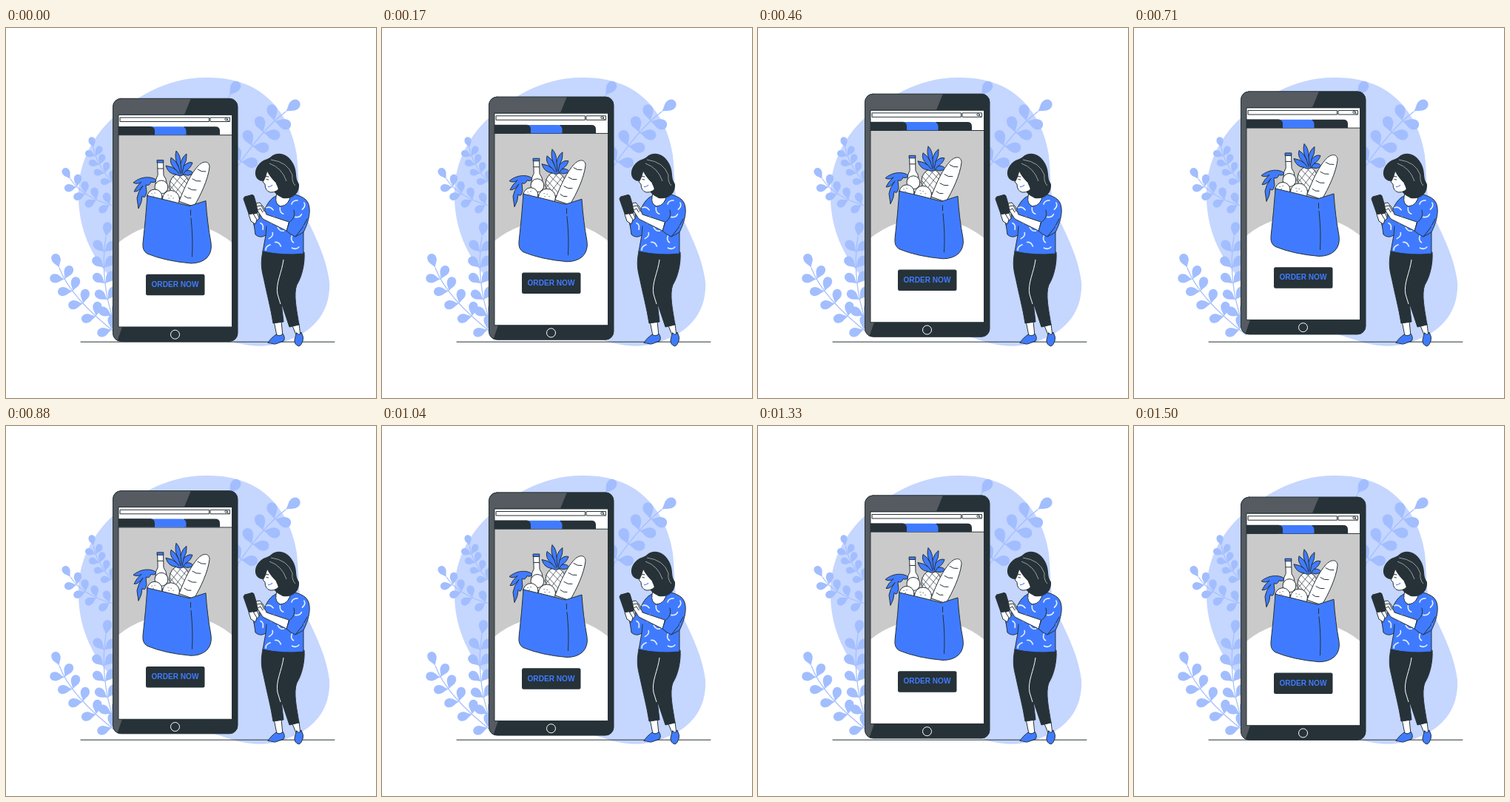
Recreate the animation shown at these times as an HTML page. Size 500x500 px, loop 1.54 s.

```html
<!DOCTYPE html>
<html lang="en">
<head>
<meta charset="utf-8">
<title>Order now</title>
<style>
  html, body { margin: 0; width: 100%; height: 100%; overflow: hidden; background: #fff; }
  svg { display: block; width: 100%; height: 100%; }
  .ink { fill: #263238; }
  .blue { fill: #407bff; }
  .white { fill: #fff; }
  .line { fill: none; }
  .edge { stroke: #263238; stroke-width: 1; stroke-linejoin: round; stroke-linecap: round; }
  .label { font: 700 10.1px "Liberation Sans", Arial, sans-serif; fill: #407bff; }
</style>
</head>
<body>
<svg viewBox="0 0 500 500">
  <clipPath id="case"><rect x="144.500" y="95.300" width="168.500" height="328.200" rx="11"/></clipPath>
  <path fill="#c5d6ff" d="M270 67C305 66 335 77 353 94C377 115 389 145 393 172C396 200 394 224 401 243C412 273 432 303 437 343C439 379 420 404 394 416C368 430 345 433 313 426L200 390L146 342C122 318 96 277 98 220C99 180 118 145 146 120C172 96 215 67 270 67Z"/>
  <g id="plants" fill="#a2beff" stroke="#a2beff"></g>
  <path class="edge" d="M101 424.2H444"/>

  <g id="woman">
    <!-- legs -->
    <g class="edge white">
      <path d="M362 396L366 416L374 416L372 396Z"/>
      <path d="M386 400L393 417L398 416L396 400Z"/>
    </g>
    <g class="edge blue">
      <path d="M354 425Q358 419 365 414Q370 418 374 413Q378 419 375 423L364 427Z"/>
      <path d="M393 412Q396 417 399 411Q403 418 401 423Q399 429 396 430Q389 428 390 421Z"/>
    </g>
    <path class="ink edge" d="M347 302L403 303C404 318 400 336 393 347C388 360 393 382 396 401L383 404L372 371L375 397L361 399C358 379 352 357 348 337C344 322 345 312 347 302Z"/>
    <path class="line" stroke="#fff" d="M375 313C373 330 364 345 367 360L371 373"/>

    <!-- far arm and body -->
    <path class="white edge" d="M331 250L327 241Q325 236 330 237L338 246L344 262L336 268Z"/>
    <path class="blue edge" d="M365 227C357 230 352 239 348 249L342 249L343 256L335 265L337 279Q343 285 351 280L347 302Q375 308 402 305L402 276C409 262 413 246 408 236C404 228 394 226 384 223Z"/>
    <path class="white edge" d="M365 228Q363 238 371 241Q383 240 385 224L381 216L367 218Z"/>
    <g id="marks" class="line" stroke="#eaf0ff" stroke-width="1.6" stroke-linecap="round" stroke-linejoin="round"></g>
    <path class="line edge" d="M352 268L351 280M389 246Q392 255 384 262M402 276L391 282"/>

    <!-- hand-held phone and near hand -->
    <path class="ink edge" d="M323 228L332 225.500Q334 225 335 227L341 247Q341 249 339 250L331 252.500Q329 253 328 251L321 231Q321 229 323 228Z"/>
    <path class="white edge" d="M382 262L352 252L348 242L343 236L338 237L340 247L347 258L379 274Z"/>
    <path class="line edge" d="M339 241L345 240L349 248M340 246L344 244L347 249"/>
    <path class="white edge" d="M328 252L331 261L337 265L339 259L334 251Z"/>
    <path class="blue edge" d="M383 262L379 274Q385 280 391 282Q402 270 407 258"/>

    <!-- head -->
    <path class="ink" d="M347 207C336 206 334 194 341 185C347 177 354 178 358 174C368 165 383 171 389 185C394 196 390 202 396 211C397 223 388 232 374 230L367 226Z"/>
    <path class="white edge" d="M353 193C351 200 350 204 347 208L350 211Q350 220 357 222Q366 223 372 213C374 205 367 203 364 208C359 203 356 199 353 193Z"/>
    <path class="ink" d="M353 187C356 198 368 209 370 227L382 224L378 186Z"/>
    <path class="line edge" d="M352 204.500L354.500 205M351 200.500L355 201"/>
    <path class="line" stroke="#407bff" stroke-width="1.2" d="M354 214.500Q358 215 360 212"/>
    <path class="line" stroke="#c8cdd0" stroke-width=".7" d="M358 178Q381 181 387 199Q386 208 391 213M356 183Q373 189 379 207"/>
  </g>

  <g id="phone">
    <g clip-path="url(#case)">
      <path class="ink" d="M144 95H314V424H144Z"/>
      <path fill="#555b60" d="M144 95H250L241 117H152V404H157L150 424H144Z"/>
    </g>
    <rect class="line edge" x="144.500" y="95.300" width="168.500" height="328.200" rx="11"/>
    <rect class="white" x="152" y="117.700" width="153.500" height="286.300"/>
    <path fill="#cacaca" d="M152 145H305.500V290A122 122 0 0 0 152 290Z"/>
    <path class="line edge" d="M152 117.700V404H305.500V117.700Z"/>

    <!-- browser bar -->
    <g class="line edge">
      <rect x="154.500" y="121" width="120" height="5.500"/>
      <rect x="276.500" y="121" width="26" height="5.500"/>
      <circle cx="297.500" cy="123.300" r="1.600"/>
      <path d="M299 124.500L301 126M152 133.500H196M152 144.700H305"/>
    </g>
    <path class="ink" d="M240 133.300H283Q289 133.300 289 139V144.500H240Z"/>
    <path class="blue" d="M194 133.300H237Q243 133.300 243.500 139V144.500H194Z"/>
    <path class="ink" d="M152 133.300H195Q201 133.300 201 139V144.500H152Z"/>

    <!-- groceries -->
    <g class="edge">
      <path class="blue" d="M204 206C196 199 181 201 172 209Q178 212 183 208Q176 214 173 221Q179 222 185 213Q178 222 177 230L179 244Q184 236 184 227Q188 232 190 222L189 212Q194 214 196 208Q200 210 204 206Z"/>
      <path class="white" d="M205 180H212.500L213 199Q217 204 217 210V228H202V210Q202 204 205 199Z"/>
      <path class="blue" d="M204.500 178.500H212.800V182H204.500Z"/>
      <path class="line" d="M205 190H212.500"/>
      <ellipse class="white" cx="234.500" cy="213" rx="13.500" ry="16"/>
      <path class="line" stroke-width=".7" d="M222 207L240 227M226 201L245 220M232 198L247 213M238 198L222 218M244 203L228 224M247 210L237 226M222 213L233 227"/>
      <path class="blue" d="M229 198Q219 197 216 186Q225 187 230 192Q220 184 223 175Q230 179 233 187Q227 176 230 166Q236 172 236 183Q238 174 244 170Q245 179 240 187Q246 180 252 182Q250 189 243 193Q249 191 253 196Q247 201 241 198Q235 201 229 198Z"/>
      <path class="line" d="M230 192L234 197M233 187L236 197M236 183L237 195M240 187L238 197M243 193L239 198"/>
      <path class="white" d="M234 234C242 213 250 197 259 187C266 179 275 179 275 188C273 205 263 226 254 241Z"/>
      <path class="line" d="M259 191Q264 195 270 194M252 204Q257 208 263 207M246 216Q251 220 257 219M241 227Q245 231 250 230"/>
      <circle class="white" cx="210" cy="215" r="9"/>
      <circle class="white" cx="201" cy="228" r="10"/>
      <circle class="white" cx="223" cy="231" r="11.500"/>
      <path class="line" d="M197 224h.2M201 223h.2M199 227h.2M219 226h.2M223 227h.2M220 230h.2M226 230h.2"/>
      <path class="blue" d="M191 226.500Q220 233 248 240.500L270 233.500Q272 264 277 290Q279 303 271 311Q263 318 250 318Q215 315 191 305Q184 301 185 291Q189 256 191 226.500Z"/>
      <path class="line" d="M249.500 246V253M250 257Q253 285 251.500 309"/>
    </g>

    <rect class="ink" x="189" y="332.800" width="79.500" height="28.500" rx="2.500"/>
    <text class="label" x="196.500" y="350">ORDER NOW</text>
    <circle cx="228.500" cy="414.200" r="6" fill="none" stroke="#fff"/>
  </g>
</svg>
<script>
  const NS = "http://www.w3.org/2000/svg";
  const get = id => document.getElementById(id);

  function add(parent, d, attrs = {}) {
    const path = document.createElementNS(NS, "path");
    path.setAttribute("d", d);
    for (const name in attrs) path.setAttribute(name, attrs[name]);
    parent.append(path);
  }

  const LEAF = "M0 0C.3 -.1 .4 -.34 .72 -.3C1.09 -.25 1.09 .25 .72 .3C.4 .34 .3 .1 0 0Z";

  function leaf(x, y, angle, size) {
    add(get("plants"), LEAF,
      { transform: `translate(${x} ${y}) rotate(${angle}) scale(${size})`, stroke: "none" });
  }

  // A curved stem from its tip to its root, with leaves in pairs.
  function branch([x0, y0], [cx, cy], [x1, y1], pairs, size, spread) {
    add(get("plants"), `M${x0} ${y0}Q${cx} ${cy} ${x1} ${y1}`, { fill: "none", "stroke-width": 1.2 });
    for (let i = 0; i <= pairs; i++) {
      const t = i / (pairs + 0.4), u = 1 - t;
      const x = u * u * x0 + 2 * u * t * cx + t * t * x1;
      const y = u * u * y0 + 2 * u * t * cy + t * t * y1;
      const dx = u * (x0 - cx) + t * (cx - x1);
      const dy = u * (y0 - cy) + t * (cy - y1);
      const angle = Math.atan2(dy, dx) * 180 / Math.PI;
      if (i === 0) leaf(x, y, angle, size);
      else for (const side of [-1, 1]) leaf(x, y, angle + side * spread, size);
    }
  }

  branch([118, 162], [123, 187], [147, 212], 4, 15, 48);
  branch([87, 204], [103, 229], [148, 241], 4, 17, 52);
  branch([135, 282], [126, 338], [146, 398], 5, 20, 45);
  branch([72, 324], [87, 365], [152, 415], 5, 20, 55);
  branch([378, 113], [345, 138], [311, 190], 4, 23, 60);
  leaf(302, 91, -55, 22);
  add(get("plants"), "M303 90L292 110", { fill: "none" });

  const marks = [
    [390, 235], [402, 241], [372, 247], [357, 244], [395, 254], [360, 259],
    [346, 268], [371, 272], [398, 268], [358, 281], [387, 285], [368, 292],
    [391, 297], [354, 296]
  ];
  marks.forEach(([x, y], i) => add(get("marks"), "M-4 3Q-3 -2 4 -2",
    { transform: `translate(${x} ${y}) rotate(${i * 137})` }));

  const LOOP = 1540, FPS = 24, TURN = 723, SPEED = 0.0135;
  const phone = get("phone");
  const start = performance.now();

  function draw(now) {
    const t = Math.max(0, now - start) % LOOP;
    const step = Math.min(36, Math.floor((t + 4) * FPS / 1000));
    const time = step * 1000 / FPS;
    const y = SPEED * (Math.abs(time - TURN) - TURN);
    phone.setAttribute("transform", `translate(0 ${y.toFixed(2)})`);
    requestAnimationFrame(draw);
  }
  draw(start);
</script>
</body>
</html>
```
